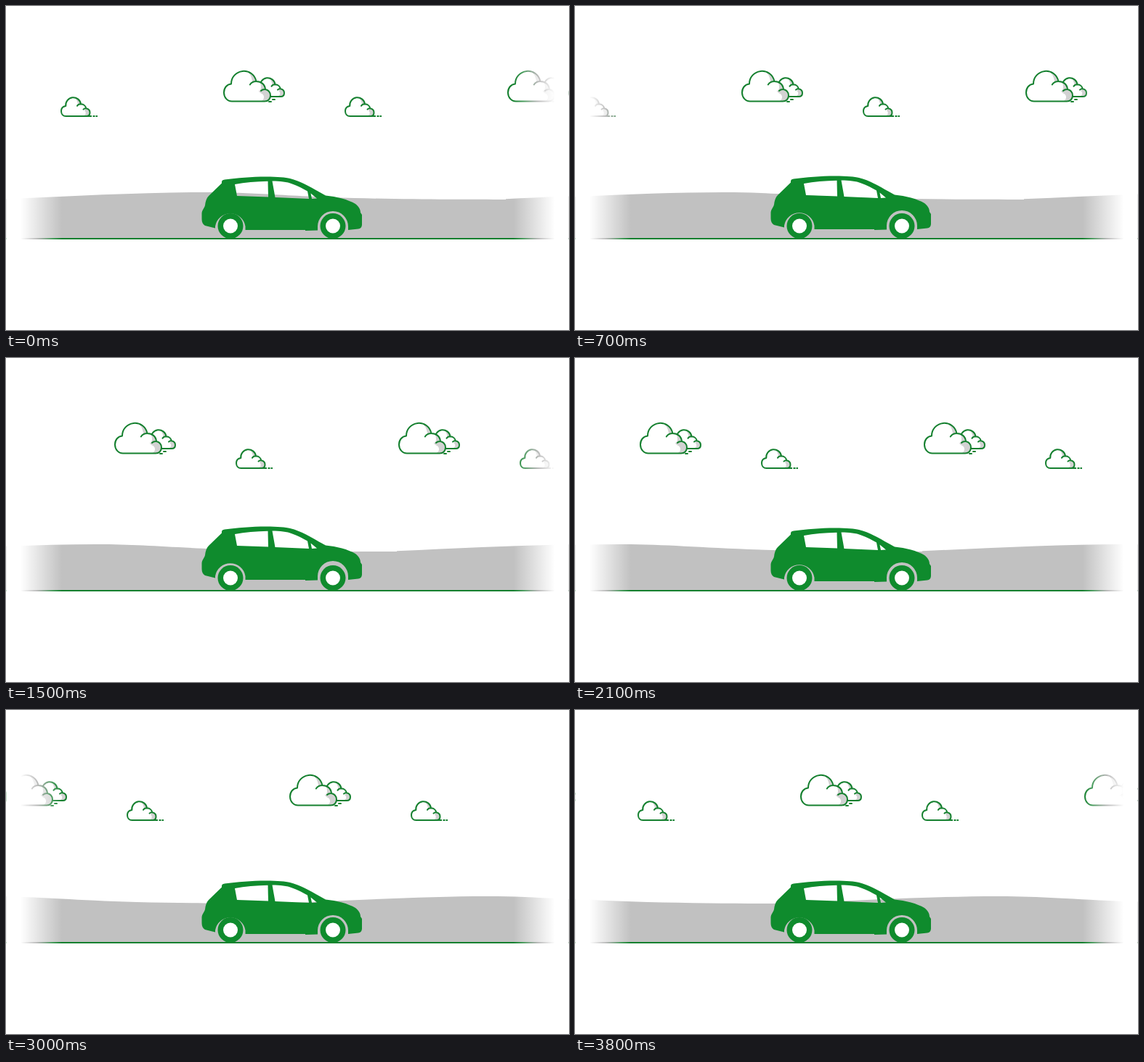
An HTML page for the animation above (3900 ms loop, 775x447 px).

```html
<!DOCTYPE html>
<html lang="en">
<head>
<meta charset="utf-8">
<title>Green car</title>
<style>
  html, body { margin: 0; width: 775px; height: 447px; overflow: hidden; background: #fff; }
  svg { display: block; }
  .line { stroke: #15802f; stroke-width: 2; stroke-linecap: round; stroke-linejoin: round; }
  .desat { mix-blend-mode: saturation; }
</style>
</head>
<body>
<svg width="775" height="447" viewBox="0 0 775 447">
  <defs>
    <linearGradient id="white">
      <stop offset="0" stop-color="#fff"/>
      <stop offset="1" stop-color="#fff" stop-opacity="0"/>
    </linearGradient>
    <linearGradient id="gray">
      <stop offset="0.67" stop-color="#808080"/>
      <stop offset="1" stop-color="#808080" stop-opacity="0"/>
    </linearGradient>

    <g id="puff">
      <path fill="#fff" d="M7.5 27H35.5C39 27 40.5 25 40.5 22C40.5 19 38.5 16.8 35 16.3C35 13 32 10.5 28 10.3A10.4 10.4 0 0 0 7.3 13C3.5 13.5 1 16.2 1 20C1 24 3.5 27 7.5 27Z"/>
      <path fill="#d2d2d2" d="M19 1.2C25 2 28 6 28 10.3L24 12C24 7 22 3.5 19 1.2ZM35 16.3C39 17 40.5 19 40.5 22C40.5 25 39 27 35.5 27H31C35 25.5 36 22 33 19Z"/>
      <path class="line" fill="none" d="M7.5 27H35.5C39 27 40.5 25 40.5 22C40.5 19 38.5 16.8 35 16.3C35 13 32 10.5 28 10.3A10.4 10.4 0 0 0 7.3 13C3.5 13.5 1 16.2 1 20C1 24 3.5 27 7.5 27ZM28 10.3C25.5 10.3 23.8 11.3 23 12.8M35 16.3C33.5 16.2 32.3 16.7 31.5 17.6"/>
    </g>
    <g id="small">
      <use href="#puff"/>
      <path class="line" style="stroke-linecap:butt" d="M36 27H43M44.5 27H47.5M48.5 27H51"/>
    </g>
    <g id="big">
      <use href="#puff" x="43.5" y="10"/>
      <path class="line" d="M68 41H71M63 44H66"/>
      <path fill="#fff" d="M12 43.5H57C62 43.5 65 40 65 35.5C65 31 62 28 58 27C57.5 20 52 16 45.5 16A17.4 17.4 0 0 0 11 19.5C5 20 1 25 1 31.5C1 38 5.5 43.5 12 43.5Z"/>
      <path fill="#d2d2d2" d="M32 1.6C40 3 45 9 45.5 16L40 18C40 11 37 5 32 1.6ZM58 27C62 28 65 31 65 35.5C65 40 62 43.5 57 43.5H52C57 41 57 36 54 33.5C52 32 50 32 49 29C52 29 53 24 51 18C55 20 57.5 23 58 27Z"/>
      <path class="line" fill="none" d="M12 43.5H57C62 43.5 65 40 65 35.5C65 31 62 28 58 27C57.5 20 52 16 45.5 16A17.4 17.4 0 0 0 11 19.5C5 20 1 25 1 31.5C1 38 5.5 43.5 12 43.5ZM45.5 16C41.5 16 38.5 17.8 36.8 20.5M58 27C55.5 26.8 53.5 27.4 52 29"/>
    </g>
    <path id="hill" fill="#c1c1c1" d="M0 266.2C100 262 190 257 275 257C340 257 380 262 480 265C560 267 640 267 688.5 267V320.5H0Z"/>
    <g id="wheel">
      <circle r="17.5" fill="#0f8b2d"/>
      <circle r="10" fill="#fff"/>
    </g>
    <g id="edge">
      <rect class="desat" x="1" y="80" width="62" height="245" fill="url(#gray)"/>
      <rect y="80" width="1" height="245" fill="#fff" opacity=".75"/>
      <rect x="1" y="80" width="19.5" height="245" fill="#fff"/>
      <rect x="20" y="80" width="57" height="245" fill="url(#white)"/>
    </g>
  </defs>

  <rect width="775" height="447" fill="#fff"/>
  <g id="clouds"></g>
  <g id="hills"></g>
  <rect y="320" width="775" height="2" fill="#15802f"/>
  <use href="#edge"/>
  <use href="#edge" transform="translate(775.5 0) scale(-1 1)"/>

  <path id="body" fill="#0f8b2d" fill-rule="evenodd" d="
    M269.5 286C270 281 273 279 274 275C274.5 270 276 265 279 262L297 244.5
    C296.5 241 298 240 301 239.5C318 237.5 338 235.5 358 235.5C374 235.5 385 236.5 391 238
    C408 242 424 253 440 261.5C455 263 471 267 481 273C486 277 488 281 488 285L490 288V302
    C489.5 306 488 307 485 307.5L471 309V304A21 21 0 0 0 429 304V309.5L412 310V309H329.5V304
    A21 21 0 0 0 288 304V306.5L274 303C271 301.5 269.5 298 269.5 294Z
    M315 246C329 243 344 242 360.5 241.7L361 263.5L318 262Z
    M366.5 241.5C377 241.5 387 242.5 394 245.5C402 248.5 409 252 415 255.5L417 266L370.5 264Z
    M419.5 258.5L428 265.5L421 266Z"/>
  <use href="#wheel" x="309" y="303.5"/>
  <use href="#wheel" x="450" y="303.5"/>
</svg>
<script>
  const LOOP = 3900, STEP = 100, SPEED = 10;
  const $ = id => document.getElementById(id);

  function place(parent, shape, x, y) {
    const el = document.createElementNS("http://www.w3.org/2000/svg", "use");
    el.setAttribute("href", "#" + shape);
    el.setAttribute("x", x);
    el.setAttribute("y", y);
    $(parent).append(el);
  }
  for (let k = 0; k < 3; k++) {
    place("clouds", "big", 299 + 391 * k, 88);
    place("clouds", "small", 75 + 391 * k, 125);
    place("hills", "hill", 688 * k, 0);
  }

  const move = (id, x, y) => $(id).setAttribute("transform", `translate(${x} ${y})`);

  function draw(time) {
    const n = Math.floor((time % LOOP) / STEP);
    move("clouds", -n * SPEED, 0);
    move("hills", -n * SPEED, 0);
    // triangle wave: highest at step 4, lowest at step 9
    const phase = (n + 6) % 10;
    move("body", 0, Math.min(phase, 10 - phase) - 4);
  }

  const start = performance.now();
  function tick() {
    draw(performance.now() - start);
    requestAnimationFrame(tick);
  }
  tick();
</script>
</body>
</html>
```
